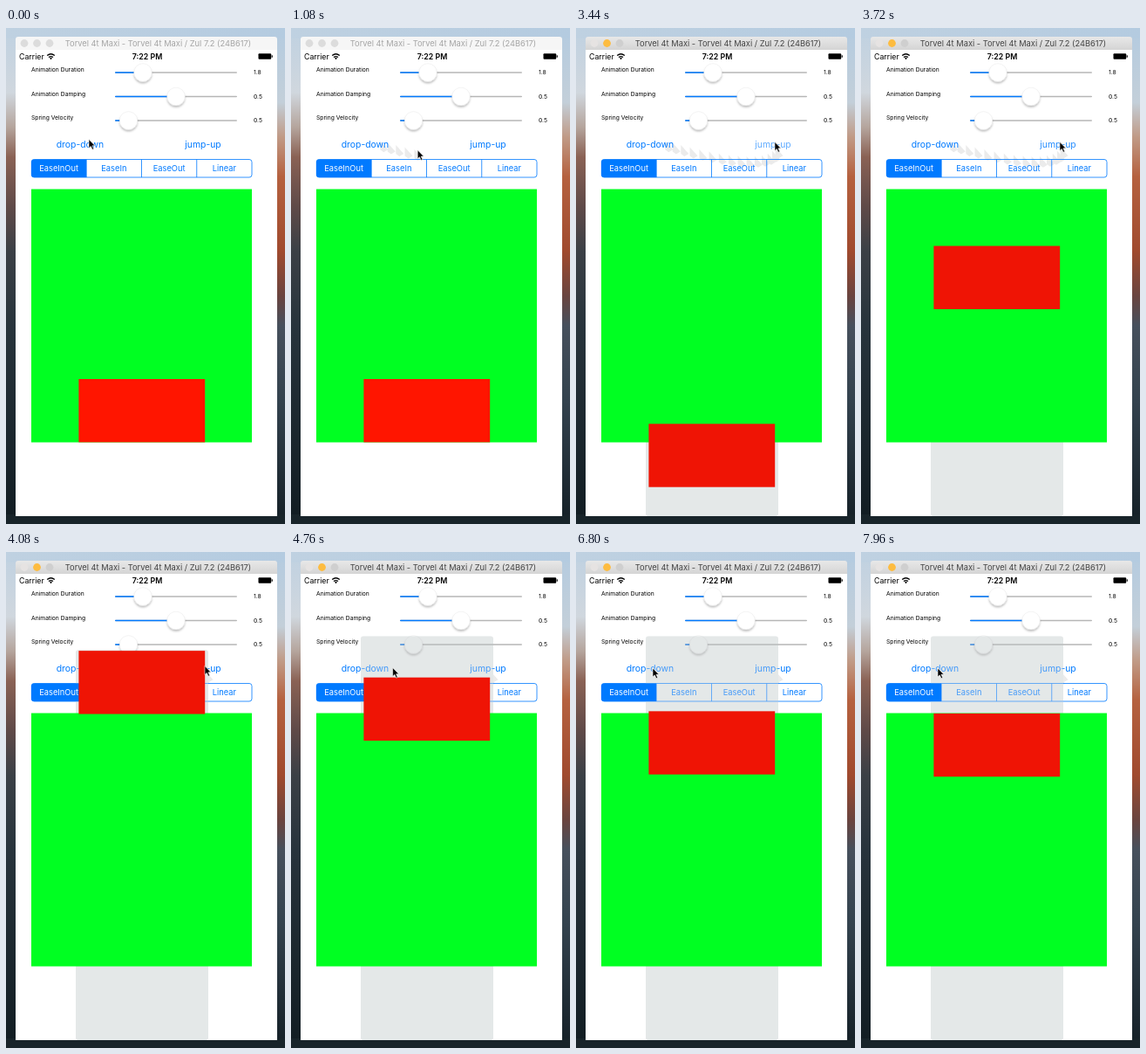
Write an HTML page that moves like this. It is 320 px wide and 568 px high and loops after 8000 ms.

```html
<!DOCTYPE html>
<html lang="en">
<head>
<meta charset="utf-8">
<style>
  html, body { margin: 0; width: 100%; height: 100%; overflow: hidden; background: #18242a; }
  svg { display: block; width: 320px; height: 568px; font-family: Inter, Roboto, sans-serif; }
  .mid { text-anchor: middle; }
  .blue { fill: #007aff; }
  .label { font-size: 6.75px; }
  .button { font-size: 10.4px; }
  .segment { font-size: 9.3px; }
  .multiply { mix-blend-mode: multiply; }
</style>
</head>
<body>
<svg viewBox="0 0 320 568">
  <defs>
    <linearGradient id="leftCliff" x2="0" y2="1">
      <stop offset="0" stop-color="#bfd1e1"/>
      <stop offset=".13" stop-color="#d0d7de"/>
      <stop offset=".2" stop-color="#b5a59d"/>
      <stop offset=".26" stop-color="#8a6255"/>
      <stop offset=".36" stop-color="#5f4a48"/>
      <stop offset=".45" stop-color="#3b4046"/>
      <stop offset=".6" stop-color="#28343c"/>
      <stop offset="1" stop-color="#111c22"/>
    </linearGradient>
    <linearGradient id="rightCliff" x2="0" y2="1">
      <stop offset="0" stop-color="#b4cbe0"/>
      <stop offset=".15" stop-color="#c3cfd9"/>
      <stop offset=".22" stop-color="#c09a86"/>
      <stop offset=".3" stop-color="#b5613f"/>
      <stop offset=".45" stop-color="#a04a2e"/>
      <stop offset=".54" stop-color="#6a443f"/>
      <stop offset=".6" stop-color="#46505c"/>
      <stop offset=".75" stop-color="#33424e"/>
      <stop offset="1" stop-color="#141f26"/>
    </linearGradient>
    <linearGradient id="sky">
      <stop offset="0" stop-color="#bfd1e1"/>
      <stop offset="1" stop-color="#b4cbe0"/>
    </linearGradient>
    <linearGradient id="activeBar" x2="0" y2="1">
      <stop offset="0" stop-color="#e8e8e8"/>
      <stop offset="1" stop-color="#d3d3d3"/>
    </linearGradient>
    <filter id="soft" x="-50%" y="-50%" width="200%" height="200%">
      <feDropShadow dx="0" dy="2" stdDeviation="1.3" flood-opacity=".25"/>
    </filter>
    <clipPath id="screen"><rect x="11" y="25" width="300" height="534"/></clipPath>
  </defs>

  <rect width="160" height="568" fill="url(#leftCliff)"/>
  <rect x="160" width="160" height="568" fill="url(#rightCliff)"/>
  <rect width="320" height="12" fill="url(#sky)"/>
  <rect y="557" width="320" height="11" fill="#18242a"/>

  <path id="bar" d="M11 26V13q0-3 3-3h294q3 0 3 3v13z"/>
  <g id="lights"></g>
  <text id="title" class="mid" x="174.5" y="20.8" font-size="9.3">Torvel 4t Maxi - Torvel 4t Maxi / Zul 7.2 (24B617)</text>
  <rect x="11" y="25" width="300" height="534" fill="#fff"/>

  <text x="15" y="36" font-size="8.8">Carrier</text>
  <path d="M47.2 31.6q4.3-3.7 8.6 0M49 33.6q2.5-2.1 5 0" fill="none" stroke="#000" stroke-width="1.3"/>
  <path d="M50 34.6q1.5-1 3 0l-1.5 1.6z"/>
  <text class="mid" x="162" y="36" font-size="8.8" font-weight="600">7:22 PM</text>
  <rect x="289.5" y="29.3" width="14.7" height="6.5" rx="1"/>
  <rect x="304.6" y="31.3" width="1.2" height="2.4"/>

  <g clip-path="url(#screen)">
    <g id="trail" fill="#ebebeb"></g>
    <rect id="wake" x="80" width="152" rx="3" fill="#e4e7e8"/>
  </g>

  <g id="sliders" class="multiply"></g>
  <text class="mid blue button" x="85" y="137.2">drop-down</text>
  <text id="jump" class="mid blue button" x="226" y="137.2">jump-up</text>

  <!-- the wake also fades the unselected segments -->
  <g id="segments"></g>
  <g clip-path="url(#screen)"><use href="#wake" opacity=".3"/></g>
  <g id="selected"></g>

  <rect x="29" y="184.5" width="253" height="290" fill="#00ff22"/>
  <g clip-path="url(#screen)"><rect id="box" x="83.4" width="144.8" height="72.4"/></g>
  <path id="cursor" d="M0 0v10l2.3-2.1 1.7 3.8 1.7-.7-1.7-3.7h3.1z" stroke="#fff" stroke-width=".6"/>
</svg>
<script>
const LOOP = 8000, ACTIVATE = 2800, LAUNCH = 2980;
const REST = 402, TOP = 184.6, DROP = 534, BOTTOM = 559;
const RATE = 2.42, DECAY = RATE / Math.sqrt(3);   // damping ratio 0.5
const PEAK = LAUNCH + Math.PI / RATE * 1000;

const $ = id => document.getElementById(id);
const clamp = v => Math.max(0, Math.min(1, v));
const progress = (t, from, to) => clamp((t - from) / (to - from));
const ease = u => u * u * (3 - 2 * u);

function add(parent, tag, attrs, text = '') {
  const el = document.createElementNS('http://www.w3.org/2000/svg', tag);
  for (const key in attrs) el.setAttribute(key, attrs[key]);
  el.textContent = text;
  return parent.appendChild(el);
}

const lights = [21, 35.5, 50].map(cx => add($('lights'), 'circle', { cx, cy: 17.5, r: 4.4 }));

[['Animation Duration', 157, '1.8'], ['Animation Damping', 195, '0.5'], ['Spring Velocity', 140.5, '0.5']]
  .forEach(([name, thumb, value], i) => {
    const g = $('sliders'), y = 51 + i * 27.5;
    add(g, 'text', { x: 29, y: y - .8, class: 'label' }, name);
    add(g, 'text', { x: 284, y: y + 2.3, class: 'label' }, value);
    add(g, 'rect', { x: 125, y: y - .8, width: 140, height: 1.6, rx: .8, fill: '#b6b6b6' });
    add(g, 'rect', { x: 125, y: y - .8, width: thumb - 125, height: 1.6, rx: .8, class: 'blue' });
    add(g, 'circle', { cx: thumb, cy: y, r: 10.3, fill: '#fff', stroke: '#e2e2e2', 'stroke-width': .4, filter: 'url(#soft)' });
  });

add($('selected'), 'path', { d: 'M92 150.5H32q-3 0-3 3v14.5q0 3 3 3h60z', class: 'blue' });
add($('segments'), 'rect', { x: 29.3, y: 150.5, width: 252.7, height: 20.5, rx: 3, fill: 'none', stroke: '#007aff', 'stroke-width': .8 });
['EaseInOut', 'EaseIn', 'EaseOut', 'Linear'].forEach((name, i) => {
  const x = 29 + i * 63.25, group = $(i ? 'segments' : 'selected');
  if (i) add(group, 'path', { d: `M${x} 150.5v20.5`, stroke: '#007aff', 'stroke-width': .8 });
  add(group, 'text', { x: x + 31.6, y: 164.2, class: 'mid segment', fill: i ? '#007aff' : '#fff' }, name);
});

// Pointer path from the first button, dipping below the second one.
function glide(u) {
  const v = 1 - u;
  const bezier = (a, b, c, d) => v * v * v * a + 3 * v * v * u * b + 3 * v * u * u * c + u * u * u * d;
  return [bezier(95, 130, 228, 230), bezier(127.5, 136, 165, 130.5)];
}
const smudges = Array.from({ length: 15 }, (_, i) => {
  const at = (i + 1) / 16, [x, y] = glide(at);
  const el = add($('trail'), 'path', { d: 'M0 0v10l4 3 5-3z', transform: `translate(${x} ${y})` });
  return { at, el };
});

function pointer(t) {
  if (t < 2000) return glide(ease(progress(t, 500, 2000)));
  if (t < 4300) {
    const u = ease(progress(t, 2400, 2800));
    return [230 - 2 * u, 130.5];
  }
  const u = ease(progress(t, 4300, 4950));
  return [228 - 140 * u, 130.5 + 2.5 * u];
}

function springY(t) {
  const s = (t - LAUNCH) / 1000;
  return TOP + DROP * Math.exp(-DECAY * s) * (Math.cos(RATE * s) + DECAY / RATE * Math.sin(RATE * s));
}

function draw(t) {
  const active = t >= ACTIVATE, launched = t >= LAUNCH;
  $('bar').setAttribute('fill', active ? 'url(#activeBar)' : '#f6f6f6');
  $('title').setAttribute('fill', active ? '#444' : '#a5a5a5');
  const colors = active ? ['#e6e3e2', '#fdbc40', '#cfcfcf'] : ['#dcdcdc', '#dcdcdc', '#dcdcdc'];
  lights.forEach((light, i) => light.setAttribute('fill', colors[i]));

  $('jump').setAttribute('opacity', active ? .25 + .75 * progress(t, LAUNCH, 3900) : 1);

  $('box').setAttribute('y', launched ? springY(t) : REST);
  $('box').setAttribute('fill', launched ? '#ef1405' : '#ff1500');
  const wakeTop = launched ? springY(Math.min(t, PEAK)) - 1 : BOTTOM;
  $('wake').setAttribute('y', wakeTop);
  $('wake').setAttribute('height', Math.max(0, BOTTOM - wakeTop));

  const moved = ease(progress(t, 500, 2000));
  for (const { at, el } of smudges) el.setAttribute('visibility', moved > at ? 'visible' : 'hidden');
  $('cursor').setAttribute('transform', `translate(${pointer(t)})`);
}

function frame() {
  draw(performance.now() % LOOP);
  requestAnimationFrame(frame);
}
frame();
</script>
</body>
</html>
```
